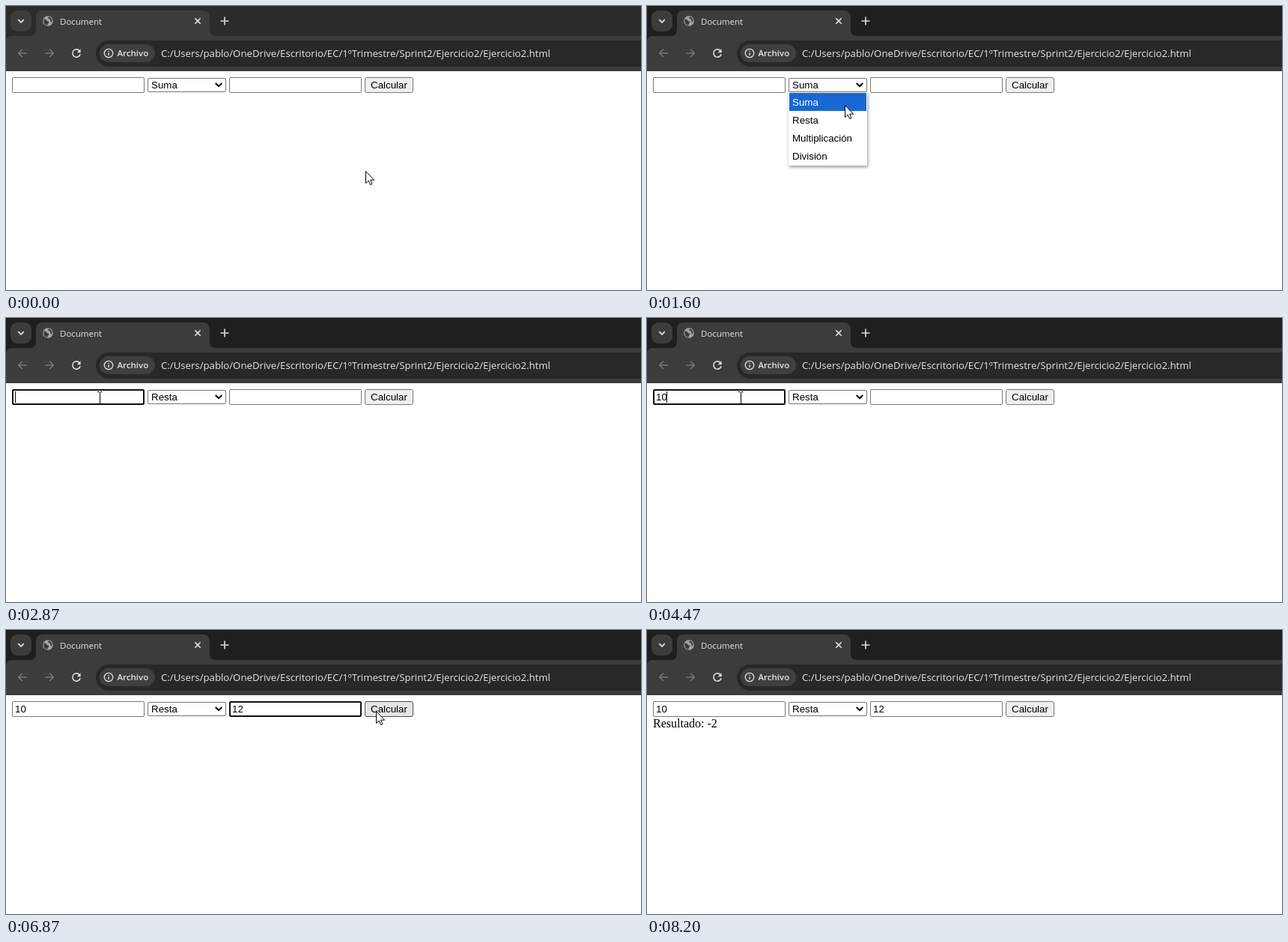
An HTML page for the animation above (9000 ms loop, 848 by 379 pixels).

```html
<!DOCTYPE html>
<html lang="es">
<head>
<meta charset="utf-8">
<title>Document</title>
<style>
html, body { margin: 0; width: 100%; height: 100%; overflow: hidden; background: #fff; }
svg { display: block; width: 100vw; height: 100vh; cursor: default; }
text { white-space: pre; }
.ui { font-family: "Open Sans", "Noto Sans", sans-serif; fill: #e6e6e6; }
.form text { font: 13.333px "Liberation Sans", Arial, sans-serif; fill: #000; }
.field { fill: #fff; stroke: #767676; }
.field.hover { stroke: #4f4f4f; }
#button { fill: #efefef; }
#button.hover { fill: #e5e5e5; }
#button.press { fill: #f5f5f5; stroke: #8d8d8d; }
#ring { fill: none; stroke: #101010; stroke-width: 2; }
#popup { filter: drop-shadow(1px 2px 2px rgb(0 0 0 / .42)); }
.icon { fill: none; stroke: #dedede; stroke-width: 1.6; }
.off { stroke: #777; }
</style>
</head>
<body>
<svg viewBox="0 0 848 379" xmlns="http://www.w3.org/2000/svg">
  <rect width="848" height="379" fill="#fff"/>

  <!-- browser frame -->
  <rect id="strip" width="848" height="50" fill="#1f1f1f"/>
  <path d="M0 87V48Q0 40 8 40H32Q40 40 40 32V15Q40 6 49 6H263Q272 6 272 15V32Q272 40 280 40H848V87Z" fill="#3c3c3c"/>
  <rect x="6" y="6" width="28" height="28" rx="9" fill="#3c3c3c"/>
  <path class="icon" style="stroke-width:1.8" d="M16.3 18.2l3.7 3.7 3.7-3.7"/>
  <circle cx="56" cy="20" r="6.8" fill="#a0a4a9"/>
  <path d="M51 17.2q2.4.3 3.3 1.9t2.2 1.6q1 .4.6 1.7t-1.7 1.2v2.4q-4.8-.7-5.2-6zM56.5 14.4q-.8 2.4 1.2 2.7t1.5 2.2 2 2.4q.8-2.4-.2-4.4t-2.7-2.6z" fill="#3c3c3c"/>
  <text class="ui" x="72" y="25" font-size="11.5">Document</text>
  <path class="icon" d="M252.3 16.3l7.4 7.4M259.7 16.3l-7.4 7.4"/>
  <path class="icon" d="M286.5 20h11M292 14.5v11"/>
  <path class="icon off" d="M28 63H17M22 57.7L16.7 63 22 68.3"/>
  <path class="icon off" d="M52 63h11M58 57.7L63.3 63 58 68.3"/>
  <path class="icon" d="M98.4 60.2A5.2 5.2 0 1 0 99.1 64.2"/>
  <path d="M99.6 57.3v5h-5z" fill="#dedede"/>
  <rect x="120" y="46" width="760" height="35" rx="17.5" fill="#282828"/>
  <rect x="125" y="51" width="74" height="24" rx="12" fill="#3f3f3f"/>
  <circle class="icon" cx="137" cy="63" r="5.7" style="stroke-width:1.3"/>
  <path class="icon" style="stroke-width:1.4" d="M137 62.3v3.8M137 59.7v1.4"/>
  <text class="ui" x="148.5" y="67" font-size="11.5" font-weight="600">Archivo</text>
  <text class="ui" x="207" y="68" font-size="13.2">C:/Users/pablo/OneDrive/Escritorio/EC/1ºTrimestre/Sprint2/Ejercicio2/Ejercicio2.html</text>

  <!-- page -->
  <g class="form">
    <rect id="first" class="field" x="8.5" y="95.5" width="176" height="20" rx="1.5"/>
    <rect id="select" class="field" x="189.5" y="96.5" width="104" height="18" rx="1.5"/>
    <rect id="second" class="field" x="298.5" y="95.5" width="176" height="20" rx="1.5"/>
    <rect id="button" class="field" x="479.5" y="95.5" width="64" height="20" rx="2.5"/>
    <path d="M279.8 103l4.2 4.2 4.2-4.2" fill="none" stroke="#000" stroke-width="2"/>
    <rect id="ring" rx="2"/>
    <text id="firstText" x="12" y="110"></text>
    <text id="choice" x="194" y="110"></text>
    <text id="secondText" x="302" y="110"></text>
    <text x="487" y="110">Calcular</text>
    <rect id="caret" y="98" width="1" height="15"/>
  </g>
  <text id="result" x="8" y="130" style="font:16px 'Liberation Serif','Times New Roman',serif">Resultado: -2</text>
  <g class="form">
    <rect id="popup" x="189" y="115" width="105" height="98" fill="#fff"/>
    <g id="options"></g>
  </g>

  <!-- pointer -->
  <g id="pointer">
    <path id="arrow" d="M.5.6V16.6L4.2 13.2 6.6 18.6 9 17.5 6.7 12.2H11.6Z" fill="#fff" stroke="#000"/>
    <path id="beam" d="M-3-8h2.5M1-8h2.5M-3 8h2.5M1 8h2.5M.5-7.5v15" fill="none" stroke="#000"/>
  </g>
</svg>
<script>
const LOOP = 9000, STEP = 1000 / 15;
const $ = id => document.getElementById(id);
const show = (el, on) => el.setAttribute("visibility", on ? "visible" : "hidden");
const put = (el, attrs) => { for (const k in attrs) el.setAttribute(k, attrs[k]); };

const controls = {
  first: [8, 95, 177, 21],
  select: [189, 96, 105, 19],
  second: [298, 95, 177, 21],
  button: [479, 95, 65, 21]
};

// start, end, destination
const moves = [
  [0, 600, 264, 96], [800, 870, 264, 100], [1400, 1730, 264, 149],
  [2130, 2470, 125, 106], [4600, 5070, 362, 104], [5600, 5670, 362, 105],
  [5670, 5730, 361, 105], [6400, 6870, 494, 108], [7530, 8130, 246, 358]
];

// start, end, x
const carets = [
  [2870, 3470, 12], [3870, 4470, 19], [4470, 5000, 26],
  [5330, 5870, 302], [6000, 6270, 309], [6270, 6800, 316]
];

const rows = ["Suma", "Resta", "Multiplicación", "División"].map((label, i) => {
  const make = (tag, attrs) => {
    const el = document.createElementNS("http://www.w3.org/2000/svg", tag);
    put(el, attrs);
    return $("options").appendChild(el);
  };
  const y = 116 + 24 * i;
  const bar = make("rect", { x: 190, y, width: 103, height: 24 });
  const text = make("text", { x: 194, y: y + 17 });
  text.textContent = label;
  return { bar, text, y };
});

function pointerAt(t) {
  let x = 480, y = 220;
  for (const [a, b, tx, ty] of moves) {
    if (t <= a) break;
    const p = Math.min(1, (t - a) / (b - a)), e = p * p * (3 - 2 * p);
    x += (tx - x) * e;
    y += (ty - y) * e;
  }
  return [Math.round(x), Math.round(y)];
}

function focusAt(t) {
  if (t < 2070 || t >= 7130) return null;
  return t < 2870 ? "select" : t < 5270 ? "first" : "second";
}

function draw(time) {
  const t = Math.round(Math.floor((time + 5) / STEP) * STEP / 10) * 10;
  const [x, y] = pointerAt(t);
  const visible = t < 8200;
  const open = t >= 1130 && t < 2070;

  let over = null;
  for (const id in controls) {
    const [cx, cy, w, h] = controls[id];
    const inside = visible && x >= cx && x < cx + w && y >= cy && y < cy + h;
    if (inside) over = id;
    $(id).classList.toggle("hover", inside);
  }
  $("button").classList.toggle("press", t >= 7130 && t < 7270);

  const focus = focusAt(t);
  show($("ring"), focus);
  if (focus) {
    const [cx, cy, w, h] = controls[focus];
    put($("ring"), { x: cx + 1, y: cy + 1, width: w - 2, height: h - 2 });
  }

  const caret = carets.find(([a, b]) => t >= a && t < b);
  show($("caret"), caret);
  if (caret) put($("caret"), { x: caret[2] });

  $("firstText").textContent = t < 3870 ? "" : t < 4470 ? "1" : "10";
  $("secondText").textContent = t < 6000 ? "" : t < 6270 ? "1" : "12";
  $("choice").textContent = t < 2070 ? "Suma" : "Resta";
  show($("result"), t >= 7270);
  put($("strip"), { fill: t < 1130 ? "#2b2b2b" : "#1f1f1f" });

  show($("popup"), open);
  show($("options"), open && t >= 1200);
  const active = y < 140 ? 0 : 1;
  rows.forEach(({ bar, text }, i) => {
    put(bar, { fill: i === active ? "#1967d2" : "#fff" });
    text.style.fill = i === active ? "#fff" : "#000";
  });

  const typing = over === "first" || over === "second";
  put($("pointer"), { transform: `translate(${x} ${y + (typing ? 0.5 : 0)})` });
  show($("arrow"), visible && !typing);
  show($("beam"), visible && typing);
}

const begin = performance.now();
function tick() {
  draw((performance.now() - begin) % LOOP);
  requestAnimationFrame(tick);
}
tick();
</script>
</body>
</html>
```
